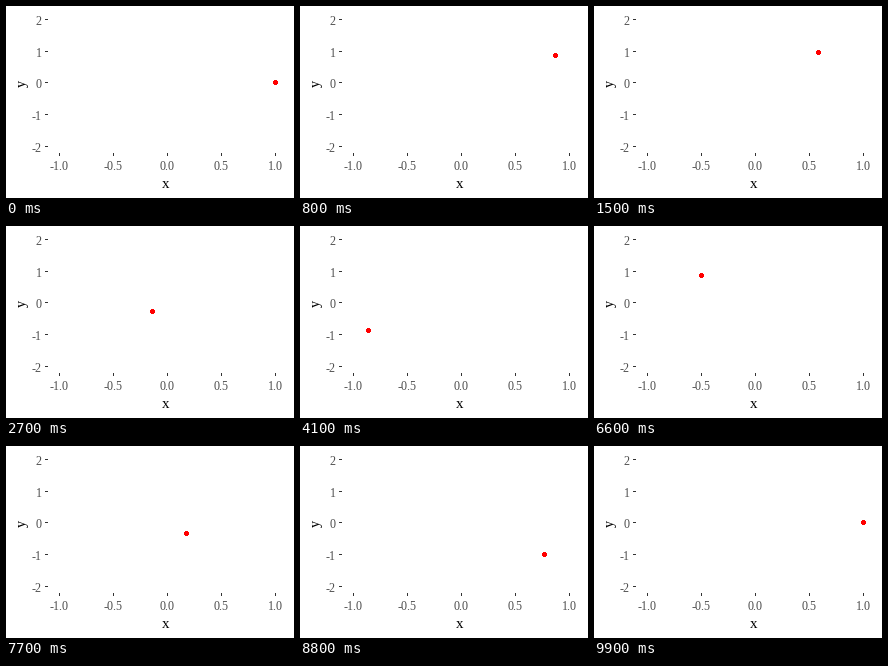
Recreate the animation shown at these times as a matplotlib script. Size 288 by 192 pixels, loop 10 s.

```python
import numpy as np
import matplotlib.pyplot as plt
from matplotlib.animation import FuncAnimation
from matplotlib.patches import Circle, Rectangle

W, H, DPI = 288, 192, 96
FRAMES, INTERVAL = 100, 100
X0, Y0 = 161, 76.35          # pixel position of the data origin
SX, SY = 108, 31.65          # pixels per data unit

plt.rcParams.update({
    "font.family": "Liberation Serif",
    "text.hinting": "native",
    "text.hinting_factor": 8,
})

fig = plt.figure(figsize=(W / DPI, H / DPI), dpi=DPI, facecolor="white")
ax = fig.add_axes([0, 0, 1, 1])
ax.set(xlim=(0, W), ylim=(H, 0))
ax.axis("off")


def to_px(x, y):
    """Nearest whole pixel for a data point."""
    return int(np.floor(X0 + SX * x + 0.5)), int(np.floor(Y0 - SY * y + 0.5))


def label(x, y, text, size, color, ha="center", **kw):
    ax.text(x, y, text, fontsize=size * 72 / DPI, color=color, ha=ha,
            va="baseline", **kw)


def tick(x, y, w, h):
    ax.add_patch(Rectangle((x, y), w, h, fc="#333333", lw=0, antialiased=False))


for v in (-1, -0.5, 0, 0.5, 1):
    px, _ = to_px(v, 0)
    tick(px, 147, 1, 3)
    label(px, 164, f"{v:.1f}", 12, "#4d4d4d")

for v in range(-2, 3):
    _, py = to_px(0, v)
    tick(39, py, 3, 1)
    label(35.5, py + 6, str(v), 12, "#4d4d4d", ha="right")

label(160, 182, "x", 15, "black")
label(20, 77, "y", 15, "black", rotation=90, rotation_mode="anchor")

# Without antialiasing every touched pixel fills: 5 px wide, corners cut.
dot = ax.add_patch(Circle((0, 0), 2, fc="red", lw=0, antialiased=False))


def update(i):
    t = 2 * np.pi * i / (FRAMES - 1)
    px, py = to_px(np.cos(t), np.sin(2 * t))
    dot.center = px + 0.5, py + 0.5
    return (dot,)


anim = FuncAnimation(fig, update, frames=FRAMES, interval=INTERVAL,
                     repeat=True, repeat_delay=0, blit=False)
plt.show()
```
